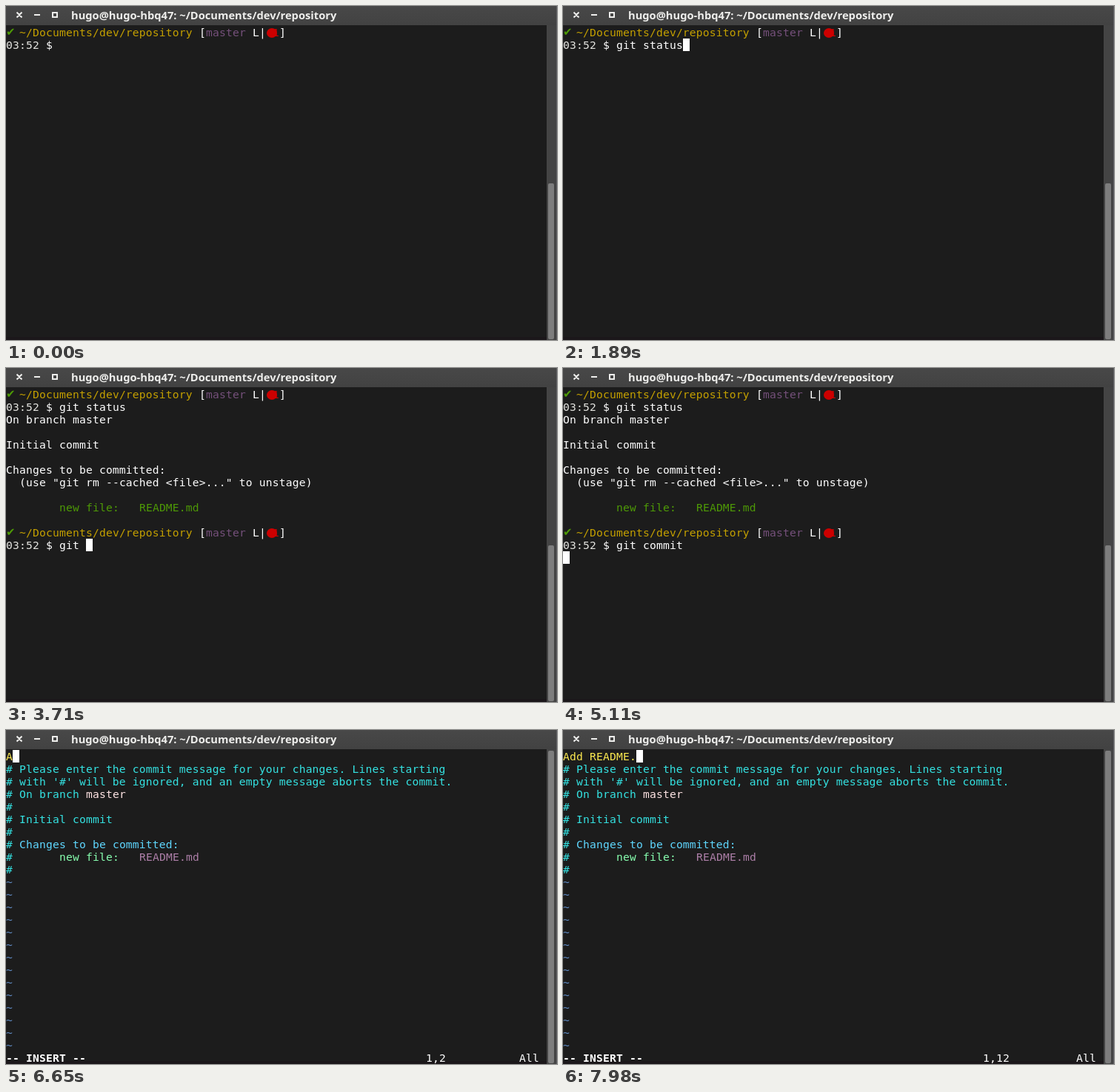
Write an HTML page that moves like this. It is 744 px wide and 452 px high and loops after 8000 ms.

```html
<!DOCTYPE html>
<html lang="en">
<head>
<meta charset="utf-8">
<title>Terminal</title>
<style>
  html, body { margin: 0; width: 100%; height: 100%; overflow: hidden; background: #1c1c1c; }
  #stage { position: relative; width: 744px; height: 452px; overflow: hidden; background: #1c1c1c; }
  #stage div, #stage span, #stage svg { position: absolute; }
  #bar { left: 0; top: 0; width: 744px; height: 26px; background: linear-gradient(#484848, #424242); }
  #title { left: 88px; top: 2px; font: bold 14.7px/20px "Noto Sans", "Open Sans", sans-serif; color: #eeeeec; white-space: pre; }
  #floor { left: 0; top: 448px; width: 744px; height: 4px; background: #1b171a; }
  #track { left: 730px; top: 26px; width: 14px; height: 426px; background: #444; }
  #edge { left: 743px; top: 0; width: 1px; height: 452px; background: #5c5c60; }
  #thumb { left: 732px; width: 8px; border-radius: 2px; background: #7d7d7d; }
  .screen { left: 0; top: 27px; width: 730px; height: 425px; }
  .screen span { font: 14.67px/17px "DejaVu Sans Mono", monospace; letter-spacing: .168px; white-space: pre; }
  .screen .tick { font: 15px/17px "DejaVu Sans", sans-serif; letter-spacing: 0; }
  .screen .bold { font-weight: bold; }
  .dot { width: 14px; height: 13px; border-radius: 50%; background: #c00; }
  #cursor { width: 9px; height: 17px; background: #fff; }
</style>
</head>
<body>
<div id="stage">
  <div id="bar">
    <svg width="80" height="26" fill="none" stroke="#eeeeec" stroke-width="2">
      <path d="M14.5 8.5l7 7m0-7l-7 7M38 12h8M63 9h6v6h-6z"/>
    </svg>
    <div id="title">hugo@hugo-hbq47: ~/Documents/dev/repository</div>
  </div>
  <div id="floor"></div>
  <div id="track"></div>
  <div id="thumb"></div>
  <div id="edge"></div>
  <div id="shell" class="screen"><div id="output"></div></div>
  <div id="editor" class="screen"></div>
  <div id="cursor"></div>
</div>
<script>
const LOOP = 8000, CELL_W = 9, CELL_H = 17, TOP = 27;
const RUN = 2310, EDIT = 5180, INSERT = 5810;
const WHITE = '#fff', GREEN = '#4e9a06', CYAN = '#34e2e2';
const $ = id => document.getElementById(id);

function put(parent, row, col, text, color = WHITE, cls = '') {
  const el = document.createElement('span');
  el.style.cssText = `left:${col * CELL_W}px;top:${row * CELL_H}px;color:${color}`;
  el.className = cls;
  el.textContent = text;
  parent.append(el);
  return el;
}

function prompt(parent, row) {
  put(parent, row, 0, '✔', GREEN, 'tick');
  put(parent, row, 2, '~/Documents/dev/repository', '#c4a000');
  put(parent, row, 29, '[');
  put(parent, row, 30, 'master', '#75507b');
  put(parent, row, 37, 'L|');
  put(parent, row, 40, '1', '#c00');
  put(parent, row, 41, ']');
  const dot = document.createElement('div');
  dot.className = 'dot';
  dot.style.cssText = `left:352px;top:${row * CELL_H + 3}px`;
  parent.append(dot);
  put(parent, row + 1, 0, '03:52', '#e4e4e0');
  put(parent, row + 1, 6, '$');
  return put(parent, row + 1, 8, '');
}

const shell = $('shell'), output = $('output'), editor = $('editor');
const cmd1 = prompt(shell, 0);
put(output, 2, 0, 'On branch master');
put(output, 4, 0, 'Initial commit');
put(output, 6, 0, 'Changes to be committed:');
put(output, 7, 2, '(use "git rm --cached <file>..." to unstage)');
put(output, 9, 8, 'new file:   README.md', GREEN);
const cmd2 = prompt(output, 11);

const message = put(editor, 0, 0, '', '#fce94f');
[
  'Please enter the commit message for your changes. Lines starting',
  "with '#' will be ignored, and an empty message aborts the commit.",
  'On branch', '', 'Initial commit', '', '', '', ''
].forEach((line, i) => put(editor, i + 1, 0, '# ' + line, CYAN));
put(editor, 3, 12, 'master', '#ffe4e4');
put(editor, 7, 2, 'Changes to be committed:', '#5fd7ff');
put(editor, 8, 8, 'new file:', '#87ffaf');
put(editor, 8, 20, 'README.md', '#ad7fa8');
for (let row = 10; row < 24; row++) put(editor, row, 0, '~', '#5f8bc4');
const info = put(editor, 24, 0, '".git/COMMIT_EDITMSG" 10L, 229C');
const mode = put(editor, 24, 0, '-- INSERT --', WHITE, 'bold');
const ruler = put(editor, 24, 63, '');
put(editor, 24, 77, 'All');

// Keystrokes: [time, text]
const status = [[700, 'g'], [840, 'i'], [980, 't'], [1120, ' '], [1400, 's'],
  [1540, 't'], [1610, 'a'], [1680, 't'], [1820, 'u'], [1890, 's']];
const commit = [[3430, 'g'], [3500, 'i'], [3640, 't'], [3710, ' '], [3850, 'c'],
  [3990, 'o'], [4200, 'm'], [4340, 'm'], [4410, 'i'], [4550, 't']];
const subject = [[6650, 'A'], [6860, 'd'], [7000, 'd'], [7140, ' '], [7280, 'R'],
  [7420, 'E'], [7560, 'AD'], [7630, 'M'], [7770, 'E'], [7980, '.']];

// Cursor homes: [time, row, column, keystrokes]
const homes = [[0, 1, 8, status], [2240, 2, 0, []], [RUN, 12, 8, commit],
  [5110, 13, 0, []], [EDIT, 0, 0, subject]];
const blinks = [[0, 70], [630, 700], [2870, 3360], [5740, INSERT]];

const typed = (keys, t) => keys.filter(k => k[0] <= t).map(k => k[1]).join('');
const show = (el, on) => { el.style.display = on ? 'block' : 'none'; };
const write = (el, text) => { if (el.textContent !== text) el.textContent = text; };

function render(t) {
  const editing = t >= EDIT, inserting = t >= INSERT;
  show(shell, !editing);
  show(editor, editing);
  show(output, t >= RUN);
  show(info, !inserting);
  show(mode, inserting);
  write(cmd1, typed(status, t));
  write(cmd2, typed(commit, t));
  const text = typed(subject, t);
  write(message, text);
  write(ruler, inserting ? `1,${text.length + 1}` : '1,0-1');

  const thumbTop = editing ? 28 : 240;
  $('thumb').style.top = thumbTop + 'px';
  $('thumb').style.height = 451 - thumbTop + 'px';

  const [, row, col, keys] = homes.filter(h => h[0] <= t).pop();
  const cursor = $('cursor');
  cursor.style.left = (col + typed(keys, t).length) * CELL_W + 'px';
  cursor.style.top = TOP + row * CELL_H + 'px';
  show(cursor, !blinks.some(([from, to]) => t >= from && t < to));
}

const start = performance.now();
function tick() {
  render((performance.now() - start) % LOOP);
  requestAnimationFrame(tick);
}
tick();
</script>
</body>
</html>
```
